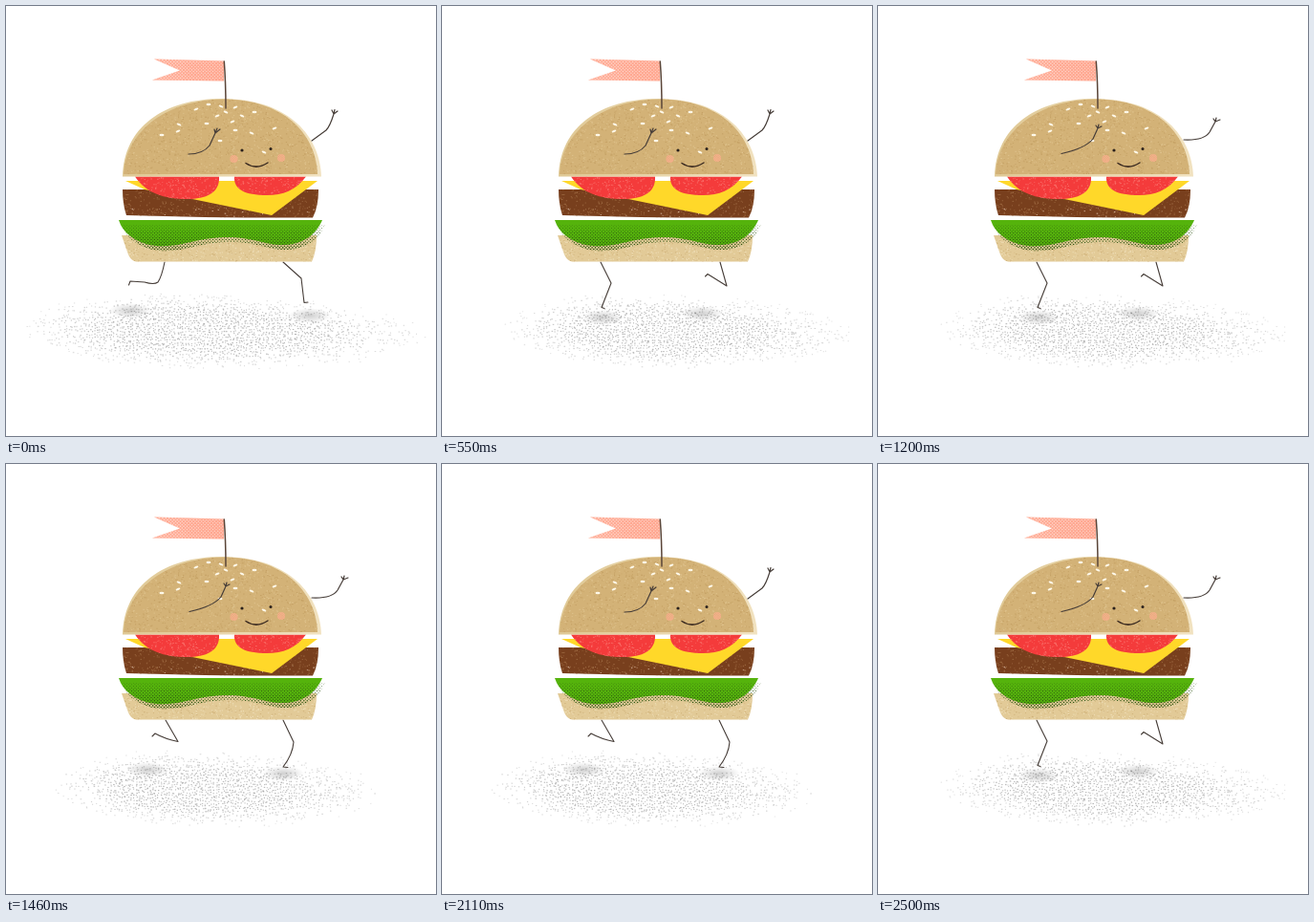
Recreate the animation shown at these times as an HTML page with a canvas. Size 450 by 450 pixels, loop 2630 ms.

```html
<!DOCTYPE html>
<html lang="en">
<head>
<meta charset="utf-8">
<title>Running burger</title>
<style>
html, body { margin: 0; width: 100%; height: 100%; overflow: hidden; background: #fff; }
canvas { display: block; width: 450px; height: 450px; }
</style>
</head>
<body>
<canvas id="stage" width="450" height="450"></canvas>
<script>
const SIZE = 450, INK = '#463d38';
const STEP = 130, LONG_STEP = 140, LONG_STEPS = 3, STEPS = 20;
const OPENING = LONG_STEPS * LONG_STEP;
const LOOP = OPENING + (STEPS - LONG_STEPS) * STEP;

function makeLayer(paint) {
  const canvas = document.createElement('canvas');
  canvas.width = canvas.height = SIZE;
  const c = canvas.getContext('2d');
  c.lineCap = c.lineJoin = 'round';
  paint(c);
  return canvas;
}

function seeded(seed) {
  return () => {
    seed = (seed * 1664525 + 1013904223) % 4294967296;
    return seed / 4294967296;
  };
}

function fill(c, path, color) {
  c.fillStyle = color;
  c.fill(path);
}

function stroke(c, path, width, color = INK) {
  c.strokeStyle = color;
  c.lineWidth = width;
  c.stroke(new Path2D(path));
}

function dot(c, x, y, r) {
  c.beginPath();
  c.arc(x, y, r, 0, Math.PI * 2);
  c.fill();
}

// Fine printed grain inside a shape.
function grain(c, path, color, count, [x, y, w, h], seed) {
  const random = seeded(seed);
  c.save();
  c.clip(path);
  c.fillStyle = color;
  for (let i = 0; i < count; i++) {
    c.fillRect(x + random() * w, y + random() * h, 0.6 + random(), 0.6 + random() * 0.6);
  }
  c.restore();
}

// Staggered dot screen inside a shape; radiusAt decides the size of each dot.
function halftone(c, path, color, [x0, y0, w, h], pitch, radiusAt) {
  c.save();
  c.clip(path);
  c.fillStyle = color;
  for (let row = 0; row * pitch / 2 < h; row++) {
    const y = y0 + row * pitch / 2;
    for (let x = x0 + (row % 2) * pitch / 2; x < x0 + w; x += pitch) {
      dot(c, x, y, radiusAt(x, y));
    }
  }
  c.restore();
}

function paintFlag(c) {
  const flag = new Path2D('M155 55.5L228 57.5V78.5L153 77.5L182 67.5Z');
  fill(c, flag, '#ffa68f');
  halftone(c, flag, '#ffd3c6', [152, 55, 78, 25], 3.4, x => 0.95 - (x - 152) / 300);
  stroke(c, 'M228.3 58Q230 80 230 107', 1.5, '#5a4538');
}

function paintFilling(c) {
  const bottomBun = new Path2D('M121 240H325Q325 257 320 267.5H136Q131 267 128 260Z');
  fill(c, bottomBun, '#e2ca97');
  grain(c, bottomBun, '#efdfb9', 420, [121, 240, 204, 28], 11);
  grain(c, bottomBun, '#cfb27b', 260, [121, 240, 204, 28], 12);

  const lettuce = new Path2D(
    'M118 224Q124 243 150 250C180 255 195 243 228 242C258 241 272 251 292 250C314 249 326 236 331 224Z');
  const lettuceShade = new Path2D();
  lettuceShade.addPath(lettuce, new DOMMatrix().translate(3, 5));
  const screen = [118, 224, 218, 36];
  fill(c, lettuce, '#55b30c');
  halftone(c, lettuceShade, '#2c5410', screen, 3.4, (x, y) => 0.3 + 0.55 * (y - 224) / 32);

  const patty = new Path2D('M122 192H327Q327 210 321 221.5Q220 222 126 219Q122 207 122 192Z');
  fill(c, patty, '#783f1d');
  grain(c, patty, '#9a663f', 500, [122, 192, 206, 31], 21);
  grain(c, patty, '#c9a58c', 45, [122, 211, 206, 12], 22);

  fill(c, new Path2D('M125 183H326L278 219L190 201L145 192Z'), '#ffd829');

  const tomatoes = new Path2D(
    'M135 178.5H223C224 196 209 202 190 202C165 202 147 196 135 178.5Z' +
    'M239 178.5H314C303 193 290 198 273 198C250 198 238 192 239 178.5Z');
  fill(c, tomatoes, '#f43b3b');
  grain(c, tomatoes, '#fa706b', 420, [135, 178, 180, 24], 31);
}

const SEEDS = [
  [199, 108], [212, 103], [225, 105], [240, 106], [260, 111], [247, 115], [221, 115],
  [210, 123], [181, 124], [180, 131], [163, 135], [230, 111], [237, 121],
  [240, 130], [257, 133], [281, 128], [224, 141], [270, 153]
];

function paintTopBun(c) {
  const rim = new Path2D('M122 178.5C123 127 165 97 226 97C290 97 328 131 330 178.5Z');
  const bun = new Path2D('M123 176C126 129 170 98 228 97.5C288 98 324 131 326 176Z');
  const rimColor = c.createLinearGradient(122, 0, 330, 0);
  rimColor.addColorStop(0, '#dfc894');
  rimColor.addColorStop(1, '#f1e2c0');
  fill(c, rim, rimColor);
  fill(c, bun, '#d3b277');
  grain(c, bun, '#c4a064', 900, [122, 97, 206, 80], 41);
  grain(c, bun, '#dfc38e', 700, [122, 97, 206, 80], 42);

  c.fillStyle = '#fff8e8';
  SEEDS.forEach(([x, y], i) => {
    c.beginPath();
    c.ellipse(x, y, 2.5, 1.2, (i % 3 - 1) * 0.4, 0, Math.PI * 2);
    c.fill();
  });

  for (const [x, y] of [[238.5, 160], [288, 159]]) {
    const cheek = new Path2D();
    cheek.arc(x, y, 4, 0, Math.PI * 2);
    halftone(c, cheek, '#f8ad8b', [x - 5, y - 5, 10, 10], 2.4, () => 0.9);
  }
  c.fillStyle = '#2a211c';
  dot(c, 247, 151, 1.6);
  dot(c, 277, 149.5, 1.5);
  stroke(c, 'M251 164.5Q262 172 274 164', 1.5, '#3a2a20');
}

const burger = makeLayer(c => {
  paintFilling(c);
  paintTopBun(c);
  paintFlag(c);
});

// Each running pose: leg paths, shadow extent and the two ground contacts.
const STRIDES = [
  {
    legs: 'M166 268Q163 283 159 289Q155 292 145 289L130 288L128.5 292M290 268L309 285L312 310.5L316 310',
    shadow: [8, 448], contacts: [[130, 319], [318, 324]]
  },
  {
    legs: 'M167 268L180 290.5Q167 288 156 282L153 285M290 268L301 291Q300 304 290 317L295 317.5',
    shadow: [40, 404], contacts: [[148, 320], [290, 324]]
  },
  {
    legs: 'M167 268L186 275Q190 279 182 285L172 297L174 299.5M290 268Q286 290 280 294Q267 304 262.5 311L265 314',
    shadow: [54, 424], contacts: [[162, 318], [265, 323]]
  },
  {
    legs: 'M166 268L185 285L188 310.5L192 310M290 268Q287 283 283 289Q279 292 269 289L254 288L252.5 292',
    shadow: [26, 424], contacts: [[192, 324], [254, 319]]
  },
  {
    legs: 'M166 268L177 290L167 315.5L170 316.5M291 268L298 293L278 280.5L275.5 283',
    shadow: [60, 436], contacts: [[168, 326], [272, 322]]
  }
];

function paintShadow(c, { shadow: [left, right], contacts }, seed) {
  const random = seeded(seed), pitch = 2.9;
  const peak = left + (right - left) * 0.42, cy = 340, ry = 41;
  for (const [x, y] of contacts) {
    c.save();
    c.translate(x, y);
    c.scale(1, 0.36);
    const glow = c.createRadialGradient(0, 0, 0, 0, 0, 22);
    glow.addColorStop(0, 'rgba(100,100,100,.3)');
    glow.addColorStop(1, 'rgba(100,100,100,0)');
    c.fillStyle = glow;
    c.fillRect(-22, -22, 44, 44);
    c.restore();
  }
  // The cloud of dots is steeper on the left and sinks slightly to the right.
  for (let y = cy - ry - 5; y < cy + ry + 5; y += pitch) {
    for (let x = left; x < right; x += pitch) {
      const px = x + (random() - 0.5) * 2.4, py = y + (random() - 0.5) * 2.4;
      const across = (px - peak) / (px < peak ? peak - left : right - peak);
      const down = (py - cy - across * 5) / ry;
      const density = Math.min(1, 2 * (1 - Math.hypot(across, down)));
      if (random() > density) continue;
      c.fillStyle = `rgba(85,85,85,${0.14 + 0.26 * density})`;
      c.fillRect(px, py, 0.9 + random() * 0.8, 0.9 + random() * 0.5);
    }
  }
}

const strideLayers = STRIDES.map((stride, i) => makeLayer(c => {
  paintShadow(c, stride, 100 + i * 17);
  stroke(c, stride.legs, 1.1);
}));

const ARMS = {
  high: 'M191 155Q206 155 213 146L219 133M219 133L218 129M219 133L221 128M219 133L224 129' +
        'M320 141L335 130Q339 126 343 113M343 113L341 109M343 113L344 108.5M343 113L347 110',
  middle: 'M192 154.5Q217 149 225 139L230 128M230 128L228 125M230 128L231 124M230 128L234 126' +
          'M320 140Q341 141 347 132L353 121M353 121L351 118M353 121L354 117M353 121L358 119',
  low: 'M192 155Q218 149 228 140L237 128M237 128L234 126M237 128L237 124M237 128L240 127' +
       'M320 140Q334 141 344 138Q354 136 363 127M363 127L363 124M363 127L369 123.5M363 127L369 127'
};
const armLayers = [ARMS.high, ARMS.middle, ARMS.low, ARMS.middle]
  .map(path => makeLayer(c => stroke(c, path, 1.2)));

function stepAt(time) {
  return time < OPENING
    ? Math.floor(time / LONG_STEP)
    : LONG_STEPS + Math.floor((time - OPENING) / STEP);
}

const stage = document.getElementById('stage').getContext('2d');
const start = performance.now();

function draw() {
  const step = stepAt((performance.now() - start) % LOOP);
  stage.fillStyle = '#fff';
  stage.fillRect(0, 0, SIZE, SIZE);
  stage.drawImage(strideLayers[step % strideLayers.length], 0, 0);
  stage.drawImage(burger, 0, 0);
  stage.drawImage(armLayers[step % armLayers.length], 0, 0);
  requestAnimationFrame(draw);
}
draw();
</script>
</body>
</html>
```
